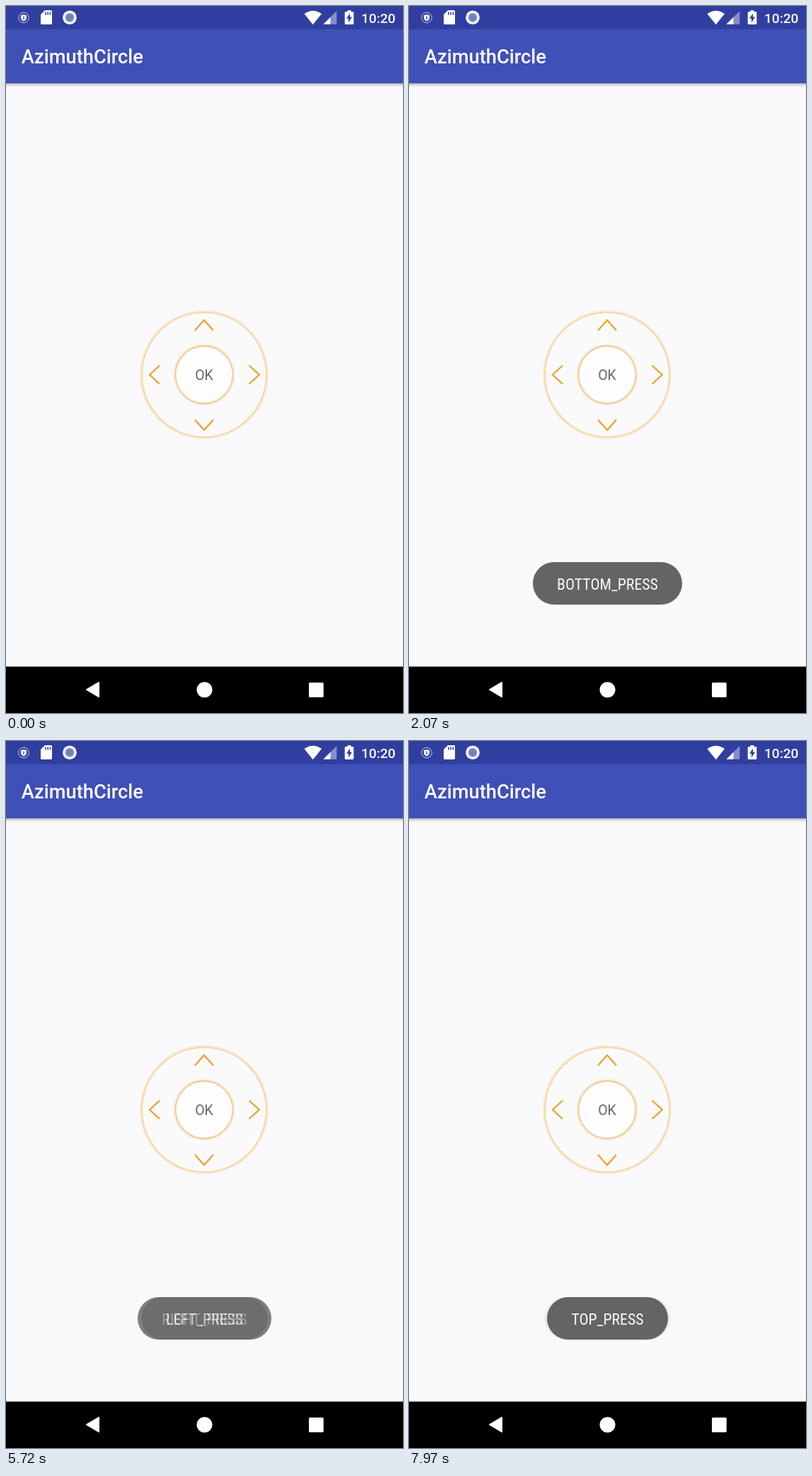
An HTML page for the animation above (8 s loop, 561 px wide and 998 px high).

```html
<!DOCTYPE html>
<html lang="en">
<head>
<meta charset="utf-8">
<title>AzimuthCircle</title>
<style>
html, body { margin: 0; width: 100%; height: 100%; overflow: hidden; background: #f9f9fb; }
svg { display: block; width: 100%; height: 100%; font-family: Roboto, sans-serif; }

.medium { font-weight: 500; fill: #fff; }
.ring { fill: none; stroke: #f9d7a6; stroke-width: 2; }
.glow { fill: none; stroke: #f7bd70; stroke-width: 3; filter: url(#soft); opacity: .6; }
.arrows { fill: none; stroke: #eea02f; stroke-width: 2.3; }
.press { opacity: 0; animation: press 8s step-end infinite; }

.toast { opacity: 0; animation: 8s linear infinite; }
.toast rect { fill: #646464; }
.toast text {
  font-family: "Roboto Condensed", Roboto, sans-serif;
  font-stretch: 75%;
  font-size: 21.8px;
  text-anchor: middle;
  fill: #fafafa;
}
.bottom { animation-name: bottom; }
.right { animation-name: right; }
.left { animation-name: left; }
.top { animation-name: top; }

/* Toasts enter with a quadratic deceleration and leave with a quadratic acceleration. */
@keyframes bottom {
  0% { opacity: 0; }
  19.6875% { opacity: 0; animation-timing-function: cubic-bezier(.333, .667, .667, 1); }
  25.9375% { opacity: 1; }
  43.75% { opacity: 1; animation-timing-function: cubic-bezier(.333, 0, .667, .333); }
  50%, 100% { opacity: 0; }
}
@keyframes right {
  0% { opacity: 0; }
  44.25% { opacity: 0; animation-timing-function: cubic-bezier(.333, .667, .667, 1); }
  50.5% { opacity: 1; }
  68.875% { opacity: 1; animation-timing-function: cubic-bezier(.333, 0, .667, .333); }
  75.125%, 100% { opacity: 0; }
}
@keyframes left {
  0% { opacity: 0; }
  69.125% { opacity: 0; animation-timing-function: cubic-bezier(.333, .667, .667, 1); }
  75.375% { opacity: 1; }
  93.6875% { opacity: 1; animation-timing-function: cubic-bezier(.333, 0, .667, .333); }
  99.9375%, 100% { opacity: 0; }
}
@keyframes top {
  0% { opacity: 0; }
  93.8125% { opacity: 0; animation-timing-function: cubic-bezier(.333, .667, .667, 1); }
  100% { opacity: 1; }
}
@keyframes press {
  0%, 15.625%, 39.875%, 68.375%, 86.5% { opacity: 0; }
  14.125%, 38.375%, 66.875%, 85% { opacity: .55; }
  100% { opacity: 0; }
}
</style>
</head>
<body>
<svg viewBox="0 0 561 998" preserveAspectRatio="none">
  <defs>
    <filter id="soft" x="-20%" y="-20%" width="140%" height="140%">
      <feGaussianBlur stdDeviation="1.8"/>
    </filter>
    <linearGradient id="shade" x2="0" y2="1">
      <stop stop-color="#000" stop-opacity=".34"/>
      <stop offset=".4" stop-color="#000" stop-opacity=".12"/>
      <stop offset="1" stop-color="#000" stop-opacity="0"/>
    </linearGradient>
  </defs>

  <rect width="561" height="998" fill="#f9f9fb"/>
  <rect y="109" width="561" height="6" fill="url(#shade)"/>
  <rect y="32" width="561" height="77" fill="#3f50b6"/>
  <rect width="561" height="32.7" fill="#303f9f"/>

  <g id="status" fill="#fff">
    <circle cx="25" cy="16.5" r="7.3" fill="none" stroke="#c3c8e5" stroke-width="1"/>
    <path d="M25 12l4 1.3v3.2q0 3.3-4 5-4-1.7-4-5v-3.2z"/>
    <path d="M25 14.5v4.5" stroke="#303f9f" stroke-width="1.4"/>
    <path d="M55 6h8.500q1.500 0 1.500 1.500v17q0 1.500-1.500 1.500h-13q-1.500 0-1.500-1.500V12z"/>
    <path d="M56 8.500v4M59.200 8.500v4M62.400 8.500v4" stroke="#303f9f" stroke-width="1.600"/>
    <circle cx="90" cy="16.200" r="9.800"/>
    <circle cx="90" cy="16.200" r="6" fill="#7480bd" stroke="#a4acd7" stroke-width="1.400"/>
    <path d="M421.500 11Q433.700 2.500 446 11L433.700 26.300Z"/>
    <path d="M467.300 7v18.800H448.500z" opacity=".42"/>
    <path d="M458.500 15.800v10H448.500z"/>
    <path d="M482.500 6h5v2h2.500q1.300 0 1.300 1.300v15.400q0 1.300-1.300 1.300h-10q-1.300 0-1.300-1.300V9.300q0-1.300 1.300-1.300h2.500z"/>
    <path d="M486 10.500v5h3l-5 8v-5.700h-3z" fill="#303f9f"/>
    <text class="medium" x="502" y="23.700" font-size="19.100">10:20</text>
  </g>

  <text class="medium" x="21.800" y="81" font-size="27.270">AzimuthCircle</text>

  <g id="wheel">
    <circle class="glow" cx="280" cy="520.500" r="88"/>
    <circle cx="280" cy="520.500" r="88" fill="#fafafb"/>
    <circle class="ring" cx="280" cy="520.500" r="88"/>
    <circle class="glow press" cx="280" cy="520.500" r="88"/>
    <circle class="glow" cx="280" cy="520.500" r="40.500"/>
    <circle cx="280" cy="520.500" r="40.500" fill="#fdfdfd" stroke="#efcb9a" stroke-width="1.800"/>
    <path class="arrows" d="M267 458l13-14.500 13 14.500M267 584l13 14.500 13-14.500M217 507.500l-14 13 14 13M343.500 507.500l14.300 13-14.300 13"/>
    <text x="280" y="528.200" font-size="19.500" text-anchor="middle" fill="#666">OK</text>
  </g>

  <g class="toast bottom">
    <rect x="175" y="785" width="211" height="60" rx="30"/>
    <text x="280.500" y="823.700">BOTTOM_PRESS</text>
  </g>
  <g class="toast right">
    <rect x="186" y="785" width="189" height="60" rx="30"/>
    <text x="280.500" y="823.700">RIGHT_PRESS</text>
  </g>
  <g class="toast left">
    <rect x="191.500" y="785" width="178" height="60" rx="30"/>
    <text x="280.500" y="823.700">LEFT_PRESS</text>
  </g>
  <g class="toast top">
    <rect x="195" y="785" width="171" height="60" rx="30"/>
    <text x="280.500" y="823.700">TOP_PRESS</text>
  </g>

  <g id="navigation" fill="#fff">
    <rect y="932.500" width="561" height="66" fill="#000"/>
    <path d="M114 965l17-10v20z" stroke="#fff" stroke-width="2" stroke-linejoin="round"/>
    <circle cx="280.500" cy="965.200" r="11"/>
    <rect x="428" y="955" width="20.700" height="20.700" rx="1.500"/>
  </g>
</svg>
</body>
</html>
```
